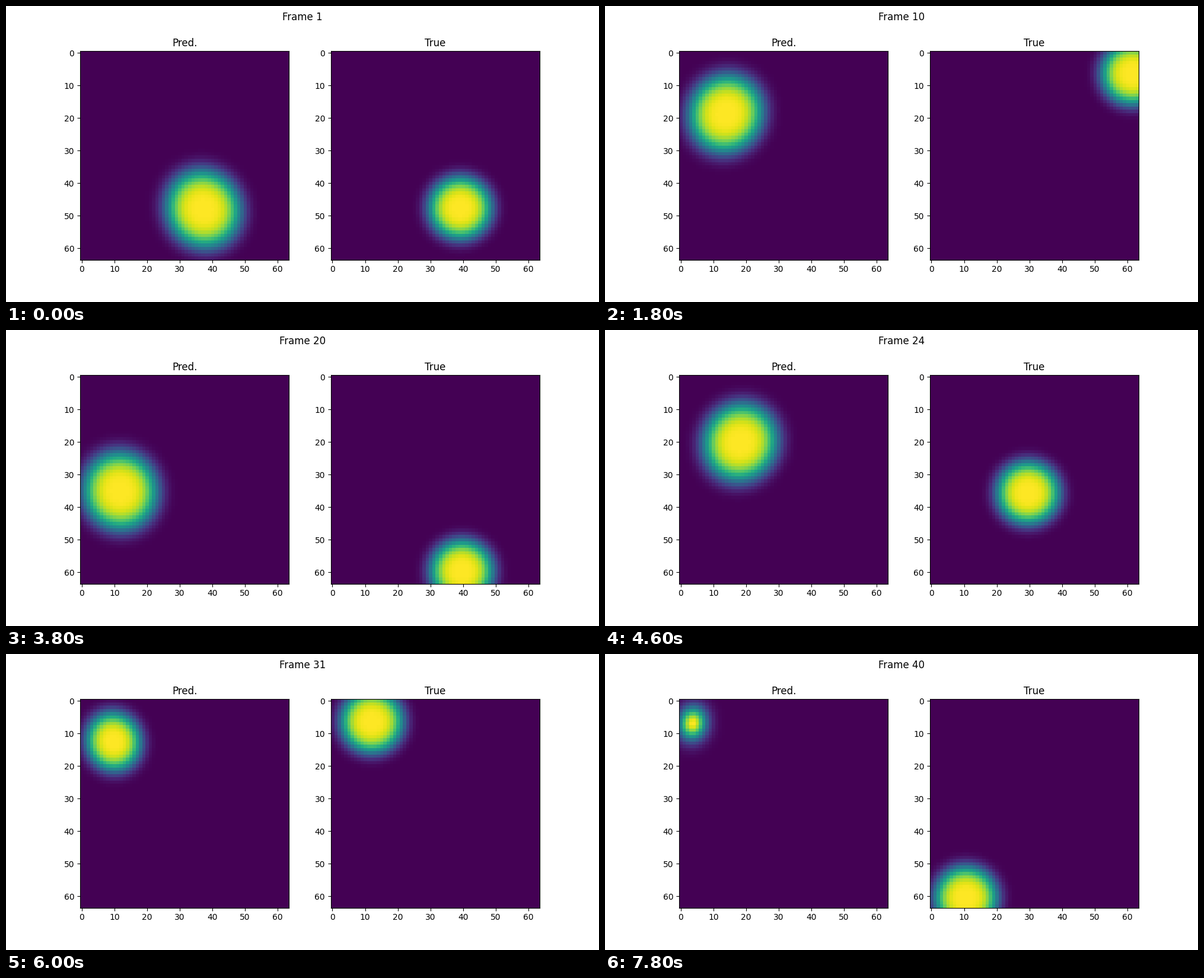
Write a matplotlib script that moves like this. It is 1000 by 500 pixels and loops after 8 s.

```python
import numpy as np
import matplotlib.pyplot as plt
from matplotlib.animation import FuncAnimation

SIZE = 64
FRAMES = 40
ROWS, COLS = np.mgrid[:SIZE, :SIZE]

# Turning points of the predicted ball
KEY_N = [1, 7, 10, 16, 18, 24, 31, 40]
KEY_X = [37.2, 15.7, 13.8, 7.0, 8.5, 18.2, 9.7, 3.6]
KEY_Y = [47.9, 5.3, 18.7, 39.2, 42.5, 20.1, 12.5, 6.9]


def bounce(pos):
    """Reflect a straight path between the first and last cell."""
    span = SIZE - 1
    pos = pos % (2 * span)
    return min(pos, 2 * span - pos)


def blob(x, y, rx, ry, shear=0.0, power=4.0):
    """Flat-topped bell that falls to half its peak at the given radii."""
    dy = ROWS - y
    dx = COLS - x - shear * dy
    field = 0.5 ** (np.hypot(dx / rx, dy / ry) ** power)
    return field / field.max()


def predicted(n):
    x = np.interp(n, KEY_N, KEY_X)
    y = np.interp(n, KEY_N, KEY_Y)
    shrink = np.clip((n - 25) / 15, 0, 1)
    radius = 10.5 - 7 * shrink
    shear = 0.05 * np.cos(2 * np.pi * (n - 1) / 16)
    return blob(x, y, radius, 1.05 * radius + 0.5 * shrink,
                shear, 4 - 2 * shrink ** 2)


def actual(n):
    x = bounce(39 + 2.5 * (n - 1))
    y = bounce(47.6 - 6 * (n - 1))
    return blob(x, y, 8.9, 8.9)


fig, axes = plt.subplots(1, 2, figsize=(10, 5), dpi=100)
title = fig.suptitle("Frame 1")
panels = []
for ax, name, field in zip(axes, ("Pred.", "True"), (predicted, actual)):
    ax.set_title(name)
    panels.append((ax.imshow(field(1), cmap="viridis", vmin=0, vmax=1), field))


def update(i):
    n = i + 1
    title.set_text(f"Frame {n}")
    for image, field in panels:
        image.set_data(field(n))
    return [title] + [image for image, _ in panels]


anim = FuncAnimation(fig, update, frames=FRAMES, interval=200,
                     repeat=True, repeat_delay=0, blit=False)
plt.show()
```
